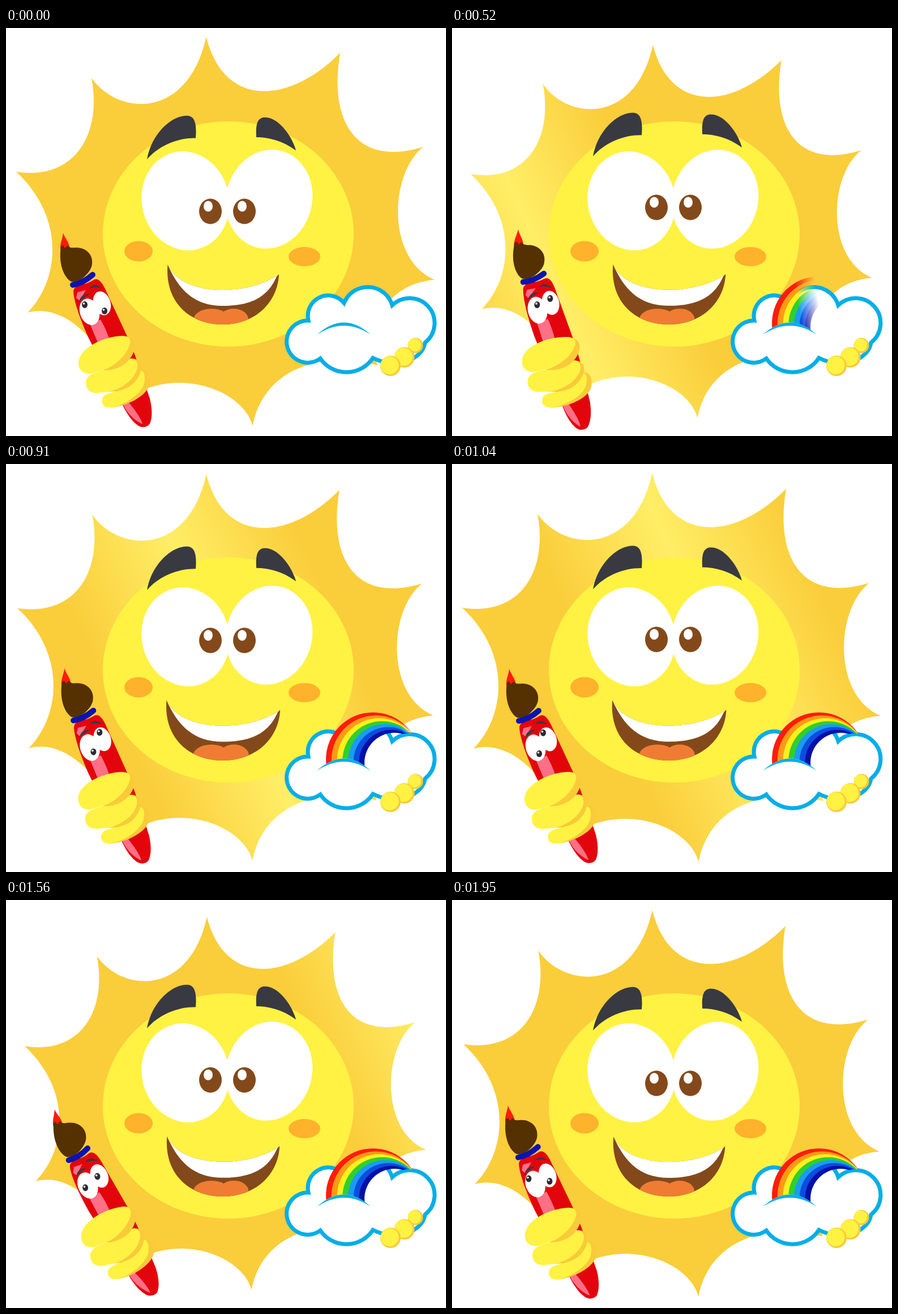
An HTML page that plays this animation: 777 by 721 pixels, repeating every 2.08 s.

```html
<!DOCTYPE html>
<html lang="en">
<head>
<meta charset="utf-8">
<title>Painting sun</title>
<style>
html, body { margin: 0; width: 100%; height: 100%; overflow: hidden; background: #fff; }
svg { display: block; width: 100vw; height: 100vh; }
.skin { fill: #fff243; }
.shade { fill: #f9ca39; }
.brown { fill: #84491a; }
.dark { fill: #393942; }
.blush { fill: #ffb22b; }
.pink { fill: #ff6f86; }
.white { fill: #fff; }
</style>
</head>
<body>
<svg viewBox="0 0 777 721">
  <defs>
    <linearGradient id="glow" gradientUnits="userSpaceOnUse" x1="-196" y1="88" x2="196" y2="-88">
      <stop offset="0" stop-color="#facd3a"/>
      <stop offset=".5" stop-color="#ffee66"/>
      <stop offset="1" stop-color="#facd3a"/>
    </linearGradient>
    <linearGradient id="wipe" gradientUnits="userSpaceOnUse" x1="-18" y1="0" x2="18" y2="-6">
      <stop offset="0" stop-color="#fff"/>
      <stop offset="1" stop-color="#000"/>
    </linearGradient>
    <mask id="bowMask" maskUnits="userSpaceOnUse" x="540" y="430" width="220" height="120">
      <rect x="540" y="430" width="220" height="120" fill="url(#wipe)"/>
      <circle cx="686" cy="528" r="53"/>
      <circle cx="711" cy="523" r="47"/>
      <path d="M540 550L549 542Q597 499 644 542V560H540Z"/>
    </mask>
    <clipPath id="mouthClip">
      <path id="lips" d="M285.500 418C310 476 430 474 482 435C480 485 440 524 383 524C325 524 280 485 285.500 418Z"/>
    </clipPath>
    <g id="pupil">
      <ellipse class="brown" rx="20" ry="22.500"/>
      <ellipse class="white" cx="-4" cy="-9" rx="8" ry="9.500"/>
    </g>
    <g id="dot">
      <ellipse rx="5" ry="6" fill="#2b2b33"/>
      <circle class="white" cx="-1.500" cy="-2" r="1.800"/>
    </g>
  </defs>

  <path id="rays" fill="url(#glow)" d="M353.500 16C385 142 500 135 590 44C570 160 615 248 737 210C676 258 672 410 757 445
    C680 450 630 520 656 596C560 570 455 600 435.500 703C420 640 298 592 205 660C175 550 100 485 38 503
    C95 445 105 335 18 254C120 270 170 190 151 88C195 153 320 166 353.500 16Z"/>

  <ellipse class="skin" cx="392.500" cy="364" rx="221.500" ry="199"/>
  <ellipse class="blush" cx="234" cy="394.500" rx="25" ry="18"/>
  <ellipse class="blush" cx="527" cy="404" rx="28" ry="17"/>
  <ellipse class="white" rx="77" ry="88" transform="translate(317 305.500) rotate(-14)"/>
  <ellipse class="white" rx="76" ry="88" transform="translate(464.500 302.500) rotate(14)"/>
  <g id="pupils">
    <use href="#pupil" x="361"/>
    <use href="#pupil" x="421"/>
  </g>
  <g id="brows" class="dark">
    <path d="M249 232C256 190 290 155 319 155C334 155 337 170 335 194.500C300 194 268 210 249 232Z"/>
    <path d="M512 216.500C505 190 480 157 457 158C443 158 441 172 442 193C465 193 490 200 512 216.500Z"/>
  </g>
  <g id="mouth">
    <use href="#lips" class="brown"/>
    <g clip-path="url(#mouthClip)">
      <path class="white" d="M285 417V410H482V435L478 439C466 466 445 491 383 491C332 491 305 463 285 417Z"/>
      <g fill="#f07c34">
        <ellipse cx="363" cy="516" rx="32" ry="20"/>
        <ellipse cx="402" cy="515" rx="26" ry="19"/>
      </g>
    </g>
  </g>

  <path class="white" stroke="#00aee8" stroke-width="7" d="M555 584A37.200 37.200 0 1 1 534 517A36 36 0 0 1 597 486
    A45 45 0 0 1 682 490A44 44 0 1 1 740 556C736 585 690 605 648 583A56 56 0 0 1 555 584Z"/>
  <g id="bow" mask="url(#bowMask)"></g>
  <path fill="#00aee8" d="M549 542Q597 499 644 542Q597 510 549 542Z"/>
  <g id="tips"></g>

  <g id="brush">
    <path fill="#ff1c0c" d="M101 362C104 372 111 377 113 390L96 392C95 380 100 372 101 362Z"/>
    <path fill="#553000" d="M97 386L101 384L104 389L109 384C113 390 118 388 124 388C143 388 154 402 152 417
      C151 427 143 435 139 439C132 446 122 450 115 448C104 442 92 420 97 386Z"/>
    <path fill="#e3050c" d="M119 466C119 458 128 453 140 452C150 449 155 444 158 444C164 443 170 450 175 461L214 545
      C228 575 246 630 254 655C259 675 258 690 254 699C250 706 238 708 230 700C222 694 212 680 205 664L146 548C134 522 120 485 119 466Z"/>
    <path fill="none" stroke="#0a14b0" stroke-width="10" stroke-linecap="round" d="M118 454Q136 451 153 436"/>
    <path class="pink" d="M124 477L126 467L141 463L130 482ZM149 525L167 515C175 530 180 540 184 556L163 558ZM206 664L217 662C228 675 240 692 241 700C228 694 214 682 206 664Z"/>
    <ellipse class="white" rx="17" ry="24" transform="translate(147.500 501.500) rotate(-18)"/>
    <ellipse class="white" rx="15" ry="21.500" transform="translate(169.500 486.500) rotate(-18)"/>
    <use id="dotL" href="#dot"/>
    <use id="dotR" href="#dot"/>
    <path class="dark" d="M129 484C131 474 138 469 147 471C139 475 135 479 129 484ZM147 460C153 452 161 453 169 460C161 458 154 458 147 460Z"/>
    <path class="shade" d="M236 604C250 600 257 618 253 632C247 650 215 668 185 671Z"/>
    <path class="skin" d="M170 655C172 647 185 645 197 641C220 633 234 612 236 605C246 605 247 620 243 631C236 650 205 667 190 670C176 673 167 667 170 655Z"/>
    <path class="shade" d="M222 584C236 584 241 596 238 606C230 634 205 643 180 643Z"/>
    <path class="skin" d="M141 627C141 612 160 608 175 604C200 598 215 583 222 584C232 586 234 595 231 604C223 628 195 640 182 643L160 645C148 645 141 638 141 627Z"/>
    <path class="shade" d="M205 545C222 544 229 552 227 566C222 592 198 605 172 605Z"/>
    <path class="skin" d="M128 592C128 566 172 545 205 544C216 544 221 549 219 557C214 583 180 604 172 604L150 611C136 612 128 604 128 592Z"/>
  </g>
</svg>
<script>
const STEP = 130, COUNT = 16;
const $ = id => document.getElementById(id);
const move = (id, value) => $(id).setAttribute('transform', value);

function circle(parent, cx, cy, r, attrs) {
  const el = document.createElementNS('http://www.w3.org/2000/svg', 'circle');
  for (const [k, v] of Object.entries({ cx, cy, r, ...attrs })) el.setAttribute(k, v);
  $(parent).append(el);
}

// Nested discs whose centres drift right give bands that narrow toward the far end.
['#ff1c0c', '#ff9a14', '#fff01e', '#2fd02c', '#1a9cf0', '#0a4ee0', '#0410a8'].forEach((fill, i) => {
  const k = i / 7;
  circle('bow', 648 + 38 * k, 522 + 6 * k, 83 - 30 * k, { fill });
});

for (const [x, y, r] of [[723, 561, 13.5], [703.5, 582, 18], [679, 597, 18]]) {
  circle('tips', x, y, r, { class: 'shade' });
  circle('tips', x - 1.5, y - 1, r - 2, { class: 'skin' });
}

// Keys are [step, x, y]
const leftLook = [[0, 139, 489], [4, 146, 492], [6, 154, 506], [8, 154, 512], [10, 148, 513], [12, 143, 505], [15, 136, 492], [16, 139, 489]];
const rightLook = [[0, 174, 500], [4, 168, 479], [6, 168, 474], [8, 161, 475], [10, 160, 480], [12, 166, 487], [15, 173, 497], [16, 174, 500]];

function look(keys, n) {
  const i = keys.findIndex(k => k[0] > n);
  const [a, ax, ay] = keys[i - 1], [b, bx, by] = keys[i];
  const k = (n - a) / (b - a);
  return `translate(${ax + (bx - ax) * k} ${ay + (by - ay) * k})`;
}

function draw(n) {
  const pulse = (1 - Math.cos(n * Math.PI / 4)) / 2;
  const lift = 1 - Math.abs(n - 8) / 8;
  const rise = n <= 8 ? n / 8 : (15 - n) / 7;
  const swing = n < 8 ? pulse : -pulse;

  move('rays', `translate(387.5 360) scale(${1 - 0.0406 * pulse}) translate(-387.5 -360)`);
  move('pupils', `translate(0 ${324 - 14 * rise})`);
  move('brows', `translate(0 ${-10.5 * lift})`);
  move('mouth', `translate(383.5 524) scale(${1 + 0.024 * lift} ${1 + 0.008 * lift}) translate(-383.5 -524)`);
  move('brush', `rotate(${5 * swing} 181 540)`);
  move('dotL', look(leftLook, n));
  move('dotR', look(rightLook, n));

  const band = 290 + 80 * (n - 8);
  $('glow').setAttribute('gradientTransform', `translate(${0.91 * band} ${-0.41 * band})`);
  $('wipe').setAttribute('gradientTransform', `translate(${508 + 30 * n} 480)`);
}

let shown = -1;
function tick() {
  const n = Math.floor(performance.now() / STEP) % COUNT;
  if (n !== shown) draw(shown = n);
  requestAnimationFrame(tick);
}
tick();
</script>
</body>
</html>
```
